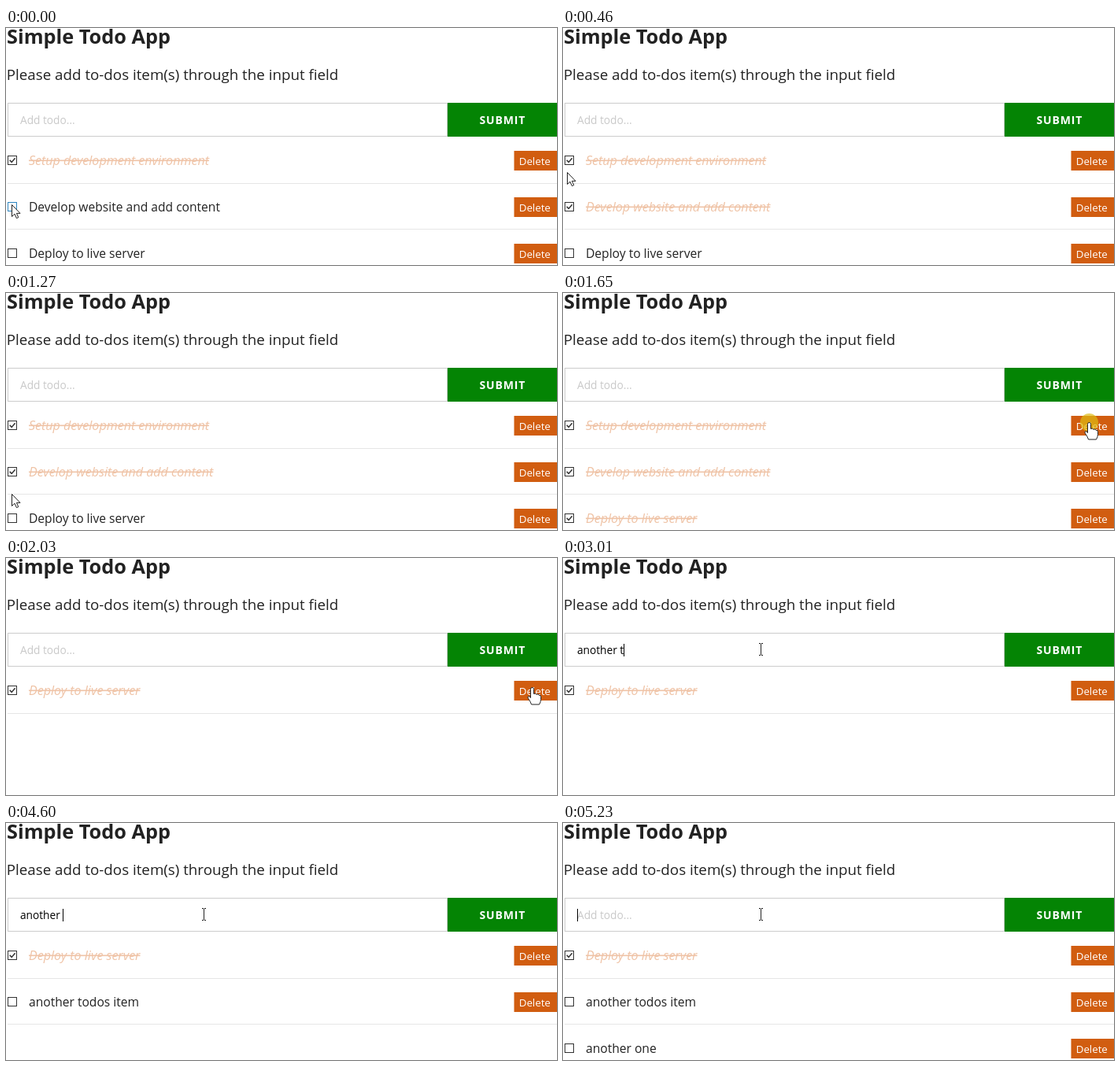
Write an HTML page that moves like this. It is 700x301 px and loops after 5300 ms.

```html
<!DOCTYPE html>
<html lang="en">
<head>
<meta charset="utf-8">
<title>Simple Todo App</title>
<style>
  html, body { margin: 0; width: 100%; height: 100%; overflow: hidden; background: #fff; }
  svg { display: block; width: 700px; height: 301px; }
  text { font-family: "Open Sans", "Noto Sans", sans-serif; fill: #222; white-space: pre; }
  .title { font-size: 25.3px; font-weight: 700; }
  .lead { font-size: 18.75px; }
  .field { font-size: 13.7px; fill: #000; }
  .field.hint { fill: #c9c9c9; }
  .submit { font-size: 14px; font-weight: 700; letter-spacing: .85px; fill: #fff; }
  .item { font-size: 15.6px; }
  .item.done { font-size: 16.1px; font-style: italic; fill: #efc3a6; text-decoration: line-through; }
  .delete { font-size: 13.3px; fill: #fff; }
  .button { fill: #d15d10; }
  .rule { fill: #e6e6e6; }
  .box { fill: #fff; stroke: #333; }
  .box.hover { stroke: #2f86c0; }
  .tick { fill: none; stroke: #333; stroke-width: 1.5; }
  .pointer { fill: #fff; stroke: #222; stroke-width: 1; stroke-linejoin: round; }
</style>
</head>
<body>
<svg id="stage" viewBox="0 0 700 301">
  <text class="title" x="1" y="20">Simple Todo App</text>
  <text class="lead" x="0.8" y="66">Please add to-dos item(s) through the input field</text>
  <rect x="2.5" y="95.5" width="558" height="42" fill="#fff" stroke="#ccc"/>
  <text id="field" class="field" x="18" y="122"></text>
  <rect id="caret" y="109" width="1" height="16"/>
  <rect x="561" y="95" width="139" height="43" fill="#048404"/>
  <text class="submit" x="601.4" y="122">SUBMIT</text>
  <g id="list"></g>
  <circle id="halo"/>
  <g id="cursor">
    <path id="arrow" class="pointer" d="M.5 .5V15.5L4 12.2 6.4 17.6 8.8 16.6 6.4 11.4H11Z"/>
    <path id="hand" class="pointer" d="M-2 2Q-2 0 0 0Q2 0 2 2V8Q4 6.8 5.5 8.8Q7.5 7.8 8.8 9.8Q11 9.2 11 12V15Q11 18 9 21.5H-1Q-2 18 -5 14Q-6.5 11.5 -4.5 11Q-3 11 -2 13Z"/>
    <path id="beam" fill="none" stroke="#222" d="M-2.5 -7.5H-.5M.5 -7.5H2.5M0 -7V7M-2.5 7.5H-.5M.5 7.5H2.5"/>
  </g>
</svg>
<script>
const LOOP = 5300;
const $ = id => document.getElementById(id);

// flips: times at which the checkbox changes
const items = [
  { label: 'Setup development environment', from: 0, to: 1800, flips: [0, 700, 1020] },
  { label: 'Develop website and add content', from: 0, to: 2030, flips: [150] },
  { label: 'Deploy to live server', from: 0, to: LOOP, flips: [1430] },
  { label: 'another todos item', from: 3790, to: LOOP, flips: [] },
  { label: 'another one', from: 5230, to: LOOP, flips: [] }
];

// runs: [start, gap, characters]
const entries = [
  { text: 'another todos item', clear: 3790, runs: [[2400, 75.5, 10], [3160, 80, 8]] },
  { text: 'another one', clear: 5230, runs: [[4040, 80, 8], [4840, 80, 3]] }
];
const FOCUS = 2330;

// time, pointer, x, y, halo radius
const moves = [
  [0, 'arrow', 7, 224, 0],
  [80, 'arrow', 7, 224, 13],
  [150, 'arrow', 7, 224, 11],
  [230, 'arrow', 7, 224, 0],
  [310, 'arrow', 7, 218, 0],
  [390, 'arrow', 6, 200, 0],
  [460, 'arrow', 5, 183, 0],
  [540, 'arrow', 5, 174, 0],
  [620, 'arrow', 4, 171, 13.5],
  [700, 'arrow', 4, 171, 11],
  [780, 'arrow', 4, 171, 0],
  [870, 'arrow', 4, 171, 11],
  [1020, 'arrow', 4, 171, 0],
  [1090, 'arrow', 5, 187, 0],
  [1160, 'arrow', 6, 220, 0],
  [1220, 'arrow', 7, 255, 0],
  [1290, 'arrow', 7, 282, 0],
  [1360, 'arrow', 7, 282, 13],
  [1430, 'arrow', 7, 282, 11],
  [1490, 'arrow', 7, 282, 0],
  [1570, 'arrow', 420, 212, 0],
  [1650, 'hand', 668.5, 164.5, 11.5],
  [1800, 'hand', 668.5, 164.5, 0],
  [1950, 'hand', 668.5, 164.5, 11.5],
  [2030, 'hand', 668.5, 164.5, 0],
  [2100, 'arrow', 545, 148, 0],
  [2180, 'beam', 340, 124, 0],
  [2250, 'beam', 251.5, 116, 12.5],
  [2330, 'beam', 251.5, 116, 0]
];

function add(tag, attrs, text) {
  const el = document.createElementNS('http://www.w3.org/2000/svg', tag);
  for (const key in attrs) el.setAttribute(key, attrs[key]);
  if (text) el.textContent = text;
  $('list').append(el);
}

function drawRow(item, i, t, hover) {
  const y = Math.round(156.4 + 58.6 * i);
  const done = item.flips.filter(f => f <= t).length % 2;
  const over = hover && hover.x < 15 && hover.y > y + 4 && hover.y < y + 19;
  add('rect', { class: over ? 'box hover' : 'box', x: 2.5, y: y + 6.5, width: 11, height: 11 });
  if (done) add('path', { class: 'tick', d: `M4.6 ${y + 11.8}l2.6 2.6 4.4-5.2` });
  add('text', { class: done ? 'item done' : 'item', x: 29, y: y + 18 }, item.label);
  add('rect', { class: 'button', x: 645.5, y, width: 54.5, height: 25 });
  add('text', { class: 'delete', x: 651.7, y: y + 18 }, 'Delete');
  add('rect', { class: 'rule', x: 2, y: Math.round(196.6 + 58.5 * i), width: 698, height: 1 });
}

function typedAt(t) {
  for (const { text, clear, runs } of entries) {
    if (t >= clear) continue;
    let n = 0;
    for (const [start, gap, count] of runs)
      if (t >= start) n += Math.min(count, Math.floor((t - start) / gap) + 1);
    return text.slice(0, n);
  }
  return '';
}

function drawField(t) {
  const typed = typedAt(t).replace(/ /g, '\u00a0');
  const field = $('field');
  field.textContent = typed || 'Add todo...';
  field.setAttribute('class', typed ? 'field' : 'field hint');
  const width = typed ? field.getComputedTextLength() : 0;
  $('caret').setAttribute('x', Math.round(18 + width));
  $('caret').style.display = t >= FOCUS ? '' : 'none';
}

function drawPointer([, kind, x, y, r]) {
  for (const id of ['arrow', 'hand', 'beam']) $(id).style.display = id === kind ? '' : 'none';
  $('cursor').setAttribute('transform', `translate(${x} ${y})`);
  const halo = $('halo');
  halo.setAttribute('cx', x);
  halo.setAttribute('cy', y);
  halo.setAttribute('r', r);
  halo.setAttribute('fill', kind === 'hand' ? 'rgba(222,188,20,.7)' : 'rgba(255,255,0,.6)');
}

let last = '';
function render(t) {
  const move = moves.filter(m => m[0] <= t).pop();
  const rows = items.filter(it => t >= it.from && t < it.to);
  const flips = items.map(it => it.flips.filter(f => f <= t).length);
  const key = [move[0], rows.length, flips, typedAt(t)].join();
  if (key === last) return;
  last = key;
  const hover = move[1] === 'arrow' ? { x: move[2], y: move[3] } : null;
  $('list').replaceChildren();
  rows.forEach((it, i) => drawRow(it, i, t, hover));
  drawField(t);
  drawPointer(move);
}

const start = performance.now();
function tick() {
  render((performance.now() - start) % LOOP);
  requestAnimationFrame(tick);
}
tick();
</script>
</body>
</html>
```
